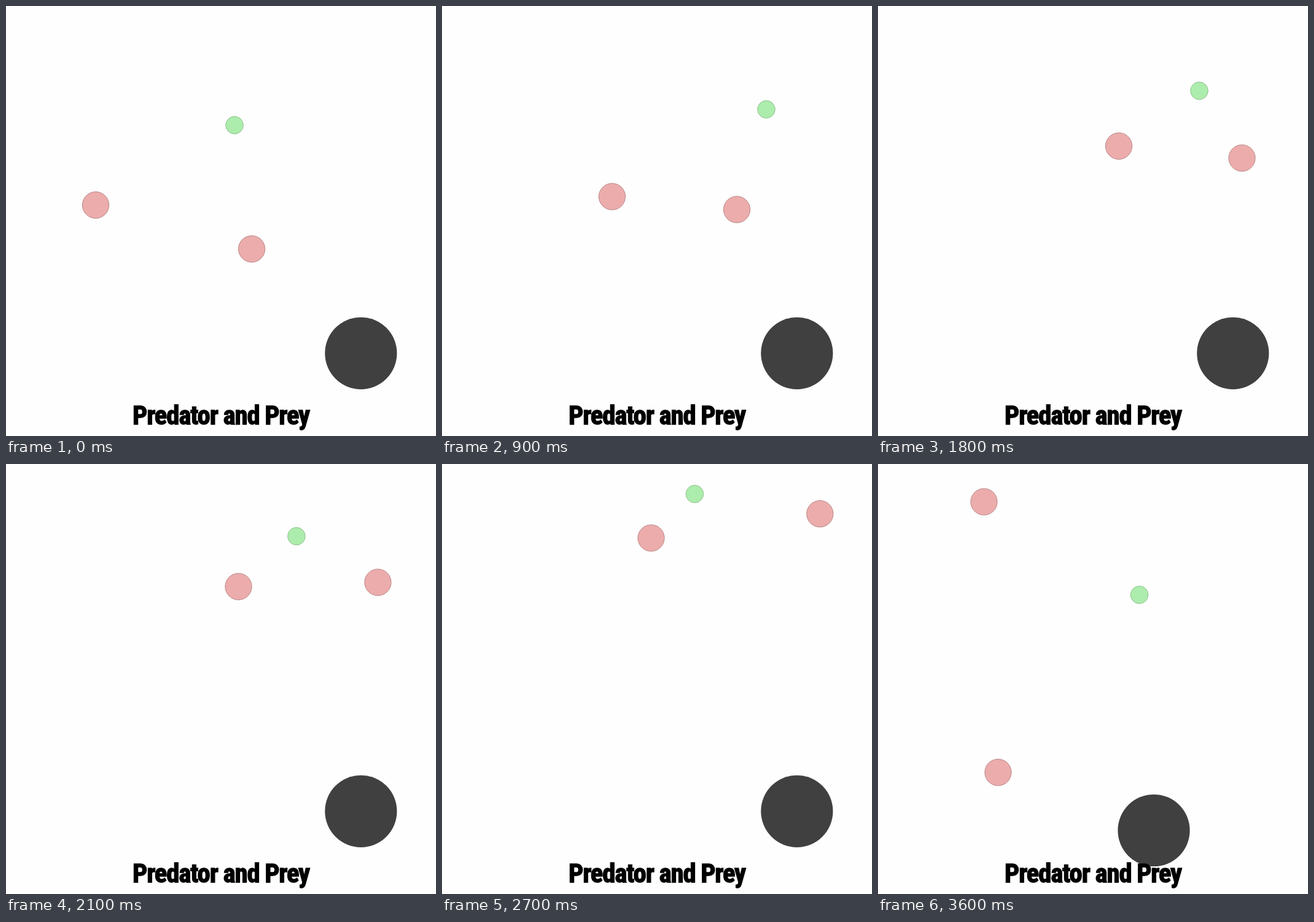
An HTML page for the animation above (3750 ms loop, 700x700 px).

```html
<!DOCTYPE html>
<html lang="en">
<head>
<meta charset="utf-8">
<title>Predator and Prey</title>
<style>
  html, body { margin: 0; width: 100%; height: 100%; overflow: hidden; background: #fefefe; }
  svg { display: block; width: 100%; height: 100%; }
  .hunter { fill: #ecacac; stroke: #b98585; }
  .prey { fill: #acecac; stroke: #8fc08f; }
  .rock { fill: #404040; }
  text {
    font-family: Impact, "Roboto Condensed", "Open Sans Condensed", Roboto, "Open Sans", sans-serif;
    font-weight: 900;
    font-stretch: condensed;
    letter-spacing: -.025em;
    text-anchor: middle;
    stroke: #000;
    stroke-width: 1.3;
  }
</style>
</head>
<body>
<svg viewBox="0 0 700 700">
  <circle id="rock" class="rock" r="58.6"/>
  <circle id="left" class="hunter" r="21.6"/>
  <circle id="right" class="hunter" r="21.6"/>
  <circle id="prey" class="prey" r="14.3"/>
  <text id="title" x="350">Predator and Prey</text>
</svg>
<script>
  const STEP = 150, STEPS = 25, LAST = STEPS - 1;
  const SPACING = 4; // steps between key points

  // The first and last key points only set the direction at the ends.
  const chase = {
    left: [[124, 326], [146, 324], [224, 316], [328, 297], [392, 228],
      [355, 168], [340, 74], [416, 22], [492, -30]],
    right: [[494, 484], [400, 395.5], [430.5, 340.5], [533, 320], [592.5, 247.5],
      [610.5, 134], [608, 31], [530, -60], [438, -145]],
    prey: [[387, 257], [372, 194], [467, 175], [571, 161], [523, 138],
      [427.5, 90.5], [418, 14.5], [505, 26], [598, 14.5]]
  };
  const restart = { rock: [449, 596.5], left: [172.5, 61.5], right: [195.5, 502], prey: [425.5, 213] };

  // Catmull-Rom curve through the key points.
  function along(points, step) {
    const i = Math.floor(step / SPACING), u = step / SPACING - i;
    const [a, b, c, d] = points.slice(i, i + 4);
    return [0, 1].map(k => b[k] + u / 2 * (c[k] - a[k]
      + u * (2 * a[k] - 5 * b[k] + 4 * c[k] - d[k]
      + u * (3 * (b[k] - c[k]) + d[k] - a[k]))));
  }

  function place(id, [x, y]) {
    const circle = document.getElementById(id);
    circle.setAttribute("cx", x);
    circle.setAttribute("cy", y);
  }

  function setTitle() {
    const title = document.getElementById("title");
    title.style.fontSize = "40px";
    const size = Math.min(45, 40 * 288 / title.getComputedTextLength());
    title.style.fontSize = size + "px";
    title.setAttribute("y", 666 + size * 0.36);
  }

  const start = performance.now();

  function draw() {
    const step = Math.floor((performance.now() - start) / STEP) % STEPS;
    const restarted = step === LAST;
    place("rock", restarted ? restart.rock : [577.8, 565.3]);
    for (const id in chase) place(id, restarted ? restart[id] : along(chase[id], step));
    requestAnimationFrame(draw);
  }

  setTitle();
  draw();
</script>
</body>
</html>
```
